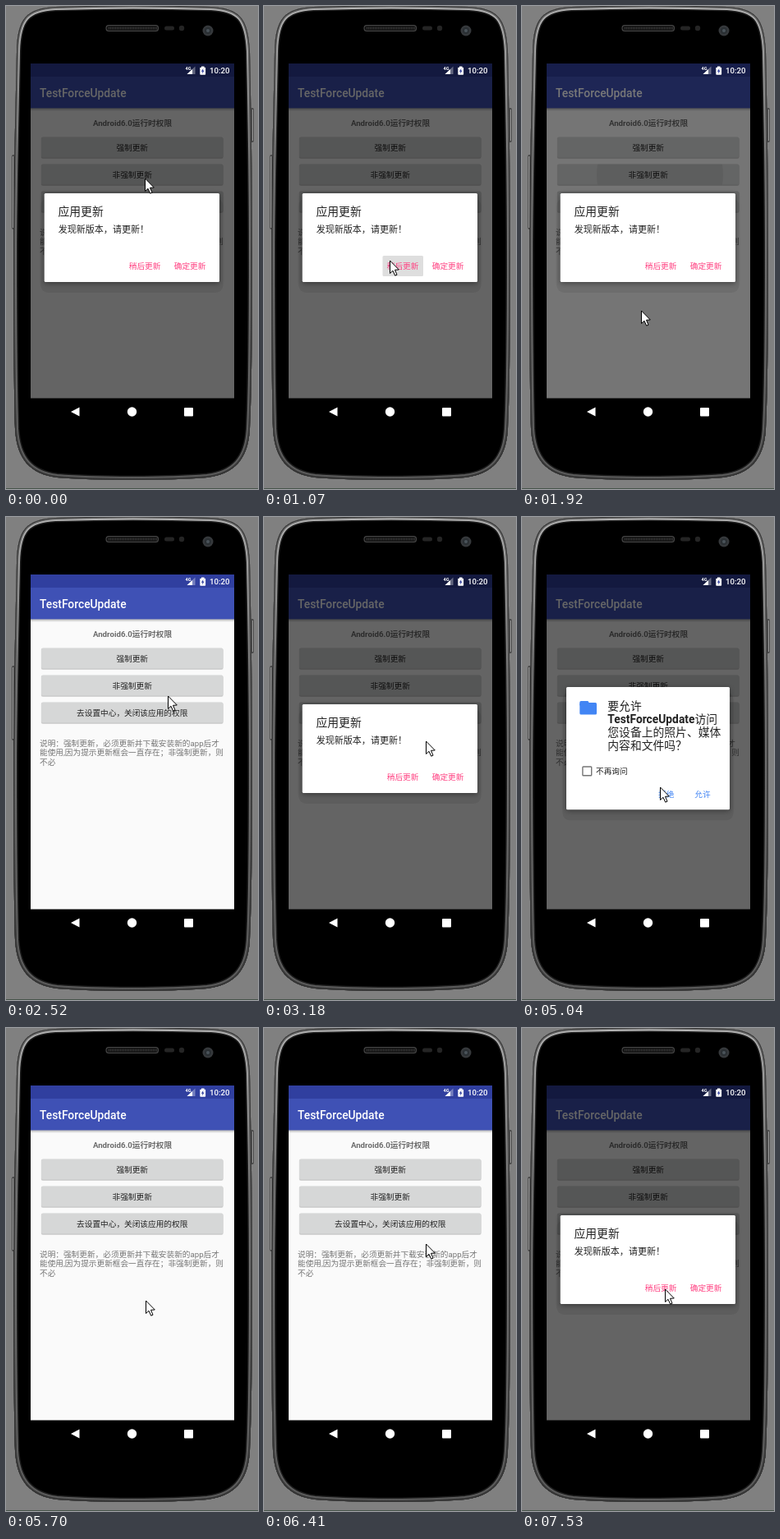
Recreate the animation shown at these times as an HTML page with a canvas. Size 307 by 588 pixels, loop 8 s.

```html
<!DOCTYPE html>
<html lang="zh-CN">
<head>
<meta charset="utf-8">
<style>
html, body { margin: 0; width: 100%; height: 100%; overflow: hidden; background: #808080; }
canvas { display: block; width: 307px; height: 588px; }
</style>
</head>
<body>
<canvas id="stage"></canvas>
<script>
const W = 307, H = 588, LOOP = 8000;
const FONT = 'Roboto, "Noto Sans CJK SC", "Noto Sans CJK JP", "Noto Sans CJK", sans-serif';
const PINK = '#ff4081', BLUE = '#4285f4', SMALL = 9.66, LARGE = 13.8;

const canvas = document.getElementById('stage');
const ratio = window.devicePixelRatio || 1;
canvas.width = W * ratio;
canvas.height = H * ratio;
const c = canvas.getContext('2d');
c.scale(ratio, ratio);

// Each step holds until the next: time, cursor position, then changes to the scene.
const steps = [
  [0, 169, 209, { dialog: 'update', shown: 1, dim: .6, press: '', ripple: 0 }],
  [270, 166, 235],
  [400, 157, 285],
  [540, 153, 309],
  [1070, 153, 309, { press: 'later' }],
  [1210, 153, 307, { shown: .4, dim: .3, press: '' }],
  [1350, 158, 265, { shown: 0, dim: 0 }],
  [1490, 168, 206],
  [1640, 168, 206, { ripple: 35 }],
  [1780, 162, 250, { ripple: 65, shown: .7, dim: .3 }],
  [1920, 145, 370, { ripple: 77, shown: 1, dim: .53 }],
  [2070, 145, 370, { ripple: 0, dim: .6 }],
  [2220, 145, 370, { shown: .4, dim: .3 }],
  [2370, 175, 290, { shown: 0, dim: 0 }],
  [2520, 197, 217],
  [2640, 197, 210, { ripple: 35 }],
  [2780, 197, 210, { ripple: 65, shown: .7, dim: .3 }],
  [2920, 197, 212, { ripple: 77, shown: 1, dim: .53 }],
  [3050, 197, 240, { ripple: 0, dim: .6 }],
  [3180, 197, 272],
  [3330, 206, 305],
  [3480, 212, 324],
  [3780, 213, 324],
  [4060, 213, 324, { dialog: 'permission', shown: .7, dim: .5 }],
  [4210, 213, 324, { shown: 1, dim: .6 }],
  [4490, 186, 319],
  [4630, 150, 314],
  [4770, 130, 320],
  [5040, 168, 328],
  [5290, 170, 331, { press: 'deny' }],
  [5425, 170, 331, { press: '', shown: .4, dim: .3 }],
  [5560, 170, 331, { shown: 0, dim: 0 }],
  [6410, 197, 262],
  [6570, 209, 232],
  [6720, 205, 210],
  [6990, 205, 210, { dialog: 'update', ripple: 50 }],
  [7170, 203, 220, { ripple: 77, shown: .7, dim: .3 }],
  [7350, 190, 270, { ripple: 0, shown: 1, dim: .6 }],
  [7530, 174, 317]
];

function stateAt(t) {
  const s = {};
  for (const [start, x, y, change] of steps) {
    if (start > t) break;
    Object.assign(s, change, { x, y });
  }
  return s;
}

function rect(x, y, w, h, color) {
  c.fillStyle = color;
  c.fillRect(x, y, w, h);
}

function round(x, y, w, h, r, color) {
  c.beginPath();
  c.roundRect(x, y, w, h, r);
  c.fillStyle = color;
  c.fill();
}

function dot(x, y, r, color) {
  c.beginPath();
  c.arc(x, y, r, 0, Math.PI * 2);
  c.fillStyle = color;
  c.fill();
}

function poly(points, color) {
  c.beginPath();
  for (let i = 0; i < points.length; i += 2) c.lineTo(points[i], points[i + 1]);
  c.closePath();
  c.fillStyle = color;
  c.fill();
}

function fade(y1, y2, ...colors) {
  const g = c.createLinearGradient(0, y1, 0, y2);
  colors.forEach((color, i) => g.addColorStop(i / (colors.length - 1), color));
  return g;
}

function text(str, x, y, size, color, weight = 400, align = 'left') {
  c.font = `${weight} ${size}px ${FONT}`;
  c.textAlign = align;
  c.fillStyle = color;
  c.fillText(str, x, y);
}

function drawPhone() {
  rect(0, 0, W, H, '#808080');
  rect(0, 587, W, 1, '#46544a');

  round(7, 181, 5, 91, 2, '#4a4a4a');
  rect(8, 183, 1, 87, '#a4a4a4');
  round(297, 124, 5, 42, 2, '#4a4a4a');
  rect(300, 126, 1, 38, '#999');

  const body = new Path2D('M60 1C120-1 190-1 250 1C285 3 295 15 297 55' +
    'C299 150 300 230 300 300C300 400 299 480 297 515C295 552 278 570 245 574' +
    'C200 578 108 578 62 574C30 570 13 552 11 515C10 480 9 400 9 300' +
    'C9 230 11 150 13 55C14 15 25 3 60 1Z');
  const rim = [
    [11, '#1c1c1c'],
    [8, fade(0, 576, '#b4b4b4', '#747474', '#6a6a6a', '#5c5c5c')],
    [4.4, fade(0, 576, '#6a6a6a', '#4c4c4c', '#3c3c3c')],
    [1.6, '#303030']
  ];
  c.save();
  c.clip(body);
  rect(0, 0, W, H, '#000');
  for (const [width, color] of rim) {
    c.lineWidth = width;
    c.strokeStyle = color;
    c.stroke(body);
  }
  c.restore();

  round(121.5, 23, 64.5, 8, 3.5, '#484848');
  round(122.5, 24, 62.5, 6, 3, '#141414');
  for (let x = 125; x < 184; x += 2) rect(x, 25.5, 1, 3, '#363636');
  round(193, 24.5, 12, 5, 2.5, '#252525');
  dot(214, 27, 3.2, '#252525');
  dot(246, 30, 6.5, '#36393c');
  dot(246, 30, 4, '#2a2f33');
  dot(246, 30, 2, '#4a535a');

  poly([79, 494, 89.5, 488.5, 89.5, 499.5], '#fff');
  dot(153.5, 494, 5.7, '#fff');
  round(217, 489, 11, 10.5, 1, '#fff');
}

function drawButton(label, y, ripple) {
  round(42.7, y + .6, 222, 26, 2, 'rgba(0,0,0,.1)');
  round(43, y + .4, 221.4, 25.6, 2, 'rgba(0,0,0,.12)');
  round(43, y, 221.4, 25.2, 2, '#d6d7d7');
  if (ripple) {
    c.save();
    c.beginPath();
    c.rect(43, y, 221.4, 25.2);
    c.clip();
    dot(168, y + 13, ripple, 'rgba(0,0,0,.07)');
    c.restore();
  }
  text(label, 153.7, y + 16.9, SMALL, '#222', 400, 'center');
}

function drawApp(s) {
  rect(30, 70, 248, 407.5, '#fafafa');
  rect(30, 124, 248, 4, fade(124, 128, 'rgba(0,0,0,.3)', 'rgba(0,0,0,0)'));
  rect(30, 70, 248, 16, '#303f9f');
  rect(30, 86, 248, 38.4, '#3f51b5');
  text('TestForceUpdate', 41, 111, LARGE, '#fff', 500);
  text('Android6.0运行时权限', 154, 145.8, SMALL, '#6c6c6c', 700, 'center');
  drawButton('强制更新', 159.4);
  drawButton('非强制更新', 192.4, s.ripple);
  drawButton('去设置中心，关闭该应用的权限', 225.4);
  ['说明：强制更新，必须更新并下载安装新的app后才',
   '能使用,因为提示更新框会一直存在；非强制更新，则',
   '不必'].forEach((line, i) => text(line, 41, 278.7 + i * 11.6, SMALL, '#757575'));
}

function drawStatus() {
  text('4G', 218.5, 77.5, 5.5, '#fff', 700);
  poly([220.5, 83, 230.5, 83, 230.5, 73.5], 'rgba(255,255,255,.35)');
  poly([220.5, 83, 227, 83, 227, 77], '#fff');
  rect(238, 73.5, 3.5, 2, '#fff');
  round(236.3, 74.7, 6.8, 9, .8, '#fff');
  poly([240.3, 76, 237.8, 79.8, 239.4, 79.8, 239, 82.4, 241.6, 78.6, 240, 78.6], '#303f9f');
  text('10:20', 248, 82, SMALL, '#fff', 500);
}

function drawPanel(x, y, w, h) {
  round(x - 4.5, y + 6, w + 9, h + 7, 9, 'rgba(0,0,0,.07)');
  c.save();
  c.shadowColor = 'rgba(0,0,0,.4)';
  c.shadowBlur = 6 * ratio;
  c.shadowOffsetY = 1.5 * ratio;
  round(x, y, w, h, 1.5, '#fff');
  c.restore();
}

function drawUpdate(s) {
  drawPanel(46.7, 228, 213.3, 108);
  if (s.press === 'later') round(144.5, 304, 49.5, 25, 1.5, '#dedede');
  text('应用更新', 63.5, 254.6, LARGE, '#212121');
  text('发现新版本，请更新！', 63.7, 275.8, 11.04, '#212121');
  text('稍后更新', 149.8, 320, SMALL, PINK);
  text('确定更新', 204.8, 320, SMALL, PINK);
}

function drawPermission(s) {
  drawPanel(54, 207, 199, 149.3);
  if (s.press === 'deny') round(154, 324, 44, 25, 1.5, '#dedede');
  round(70.3, 224, 11, 6, 1.5, BLUE);
  round(70.3, 226, 20.7, 14.5, 1.5, BLUE);
  text('要允许', 104.3, 235, LARGE, '#212121');
  text('TestForceUpdate', 104.3, 251, LARGE, '#212121', 700);
  text('访问', 104.3 + c.measureText('TestForceUpdate').width, 251, LARGE, '#212121');
  text('您设备上的照片、媒体', 104.3, 267.2, LARGE, '#212121');
  text('内容和文件吗？', 104.3, 283.3, LARGE, '#212121');
  c.lineWidth = 1.4;
  c.strokeStyle = '#757575';
  c.beginPath();
  c.roundRect(73.9, 304, 10.8, 10.8, .8);
  c.stroke();
  text('不再询问', 90, 313.2, SMALL, '#212121');
  text('拒绝', 166, 340.7, SMALL, BLUE);
  text('允许', 210.3, 340.7, SMALL, BLUE);
}

function drawCursor(x, y) {
  c.save();
  c.translate(x, y);
  c.lineWidth = 1;
  c.lineJoin = 'miter';
  c.strokeStyle = '#000';
  poly([.5, 1, .5, 16.5, 4, 13.3, 6.7, 19.2, 9, 18.2, 6.5, 12.3, 11.3, 12], '#fff');
  c.stroke();
  c.restore();
}

function draw(t) {
  const s = stateAt(t);
  drawPhone();
  c.save();
  c.beginPath();
  c.rect(30, 70, 248, 408);
  c.clip();
  drawApp(s);
  rect(30, 70, 248, 408, `rgba(0,0,0,${s.dim})`);
  drawStatus();
  if (s.shown) {
    c.globalAlpha = s.shown;
    (s.dialog === 'update' ? drawUpdate : drawPermission)(s);
  }
  c.restore();
  drawCursor(s.x, s.y);
}

const begin = performance.now();
function tick() {
  draw((performance.now() - begin) % LOOP);
  requestAnimationFrame(tick);
}
tick();
</script>
</body>
</html>
```
